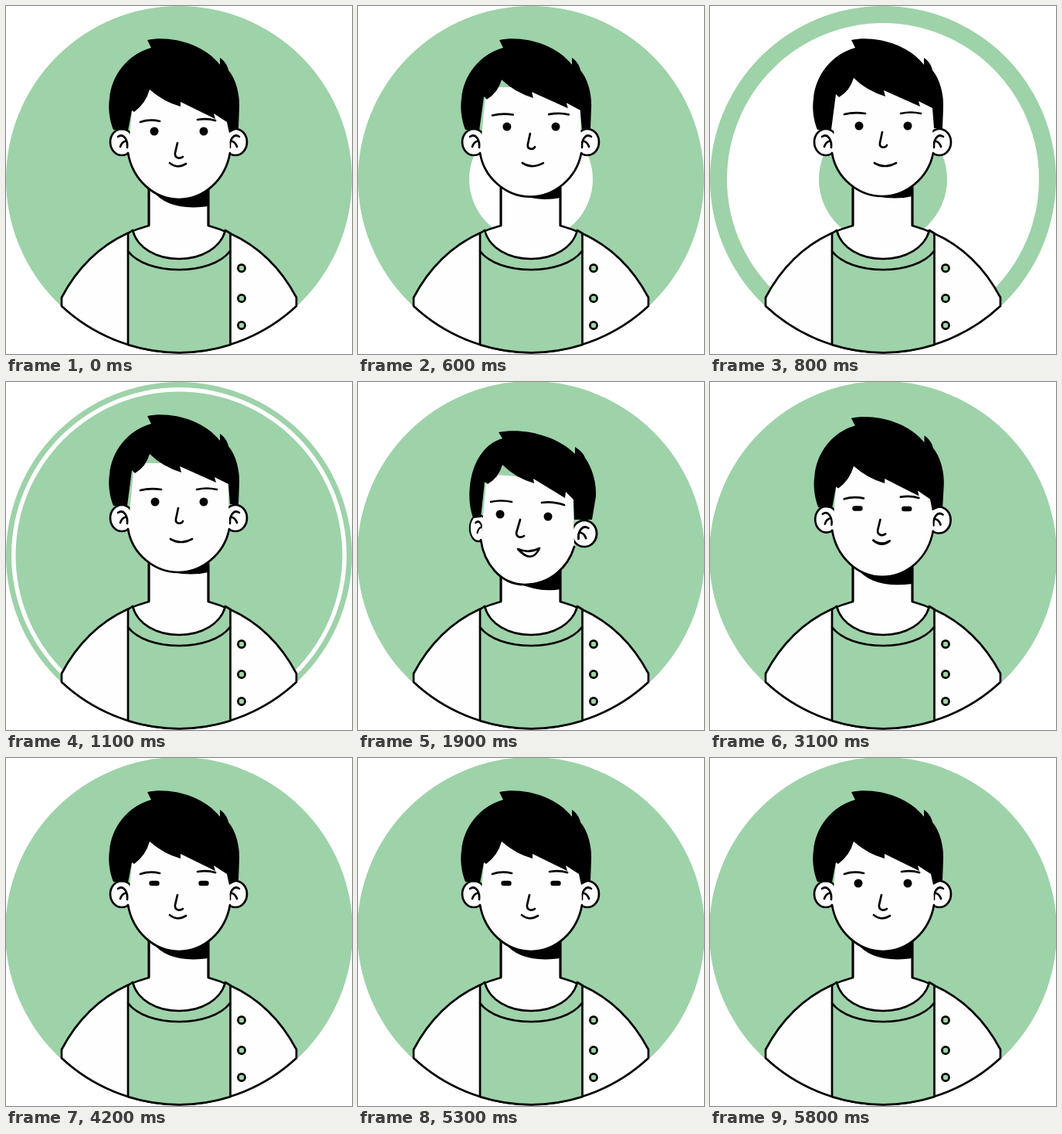
Write an HTML page that moves like this. It is 448 by 450 pixels and loops after 6000 ms.

```html
<!DOCTYPE html>
<html lang="en">
<head>
<meta charset="utf-8">
<title>Avatar</title>
<style>
  html, body { margin: 0; width: 100%; height: 100%; overflow: hidden; background: #fff; }
  svg { display: block; width: 100%; height: 100%; }
  .green { fill: #9ed2a9; }
  .skin { fill: #fefefe; }
  .line { stroke: #000; stroke-width: 2.7; stroke-linecap: round; stroke-linejoin: round; }
  .none { fill: none; }
</style>
</head>
<body>
<svg viewBox="0 0 448 450">
  <clipPath id="neck"><path d="M185 225H262V300H185Z"/></clipPath>

  <circle class="green" cx="224" cy="224" r="224"/>
  <circle id="ringOuter" cx="224" cy="224" fill="#fff"/>
  <circle id="ringInner" class="green" cx="224" cy="224"/>

  <path class="skin line" d="M185 230V284Q170 288 157 294C118 312 91 341 72 377V388A223 223 0 0 0 376 388V377C357 341 330 312 290 294Q276 288 262 284V230Z"/>
  <path class="green line" d="M158 294L164 290C170 313 195 327 224 327S278 313 284 290L290.5 294V438A223 223 0 0 1 158 438Z"/>
  <path class="line none" d="M158 317C170 333 197 341 224 341S278 333 290 317"/>
  <g id="buttons" class="green line"></g>

  <path id="shadow" clip-path="url(#neck)"/>
  <path class="line none" d="M185 236V284M262 236V284"/>
  <g id="earL"><ellipse class="skin line" rx="15" ry="17"/><path class="line none" d="M-5-7C2-12 8-3 7 7M-2 6Q0 0 4-1"/></g>
  <g id="earR"><ellipse class="skin line" rx="15" ry="17"/><path class="line none" d="M5-7C-2-12-8-3-7 7M2 6Q0 0-4-1"/></g>
  <path id="face" class="skin"/>
  <path id="jaw" class="line none"/>
  <path id="hair"/>
  <path id="brows" class="line none"/>
  <path id="nose" class="line none"/>
  <path id="mouth" class="skin line"/>
  <rect id="eyeL"/>
  <rect id="eyeR"/>
</svg>
<script>
const $ = id => document.getElementById(id);
const ARGS = { M: 2, L: 2, C: 6, S: 4, Q: 4, Z: 0 };
const SHAPES = {
  shadow: 'MQLLZ', face: 'MCSLLZ', jaw: 'MCS', hair: 'MCCLCLCCLLLLLLLQQLLZ',
  brows: 'MQMQ', nose: 'MLC', mouth: 'MQQZ'
};

const crown = [139,160, 132,142,133,126,134,120, 136,90,158,62,188,54, 183,44,
  212,38,255,48,277,76, 277,67, 283,71,287,77,288,83, 298,95,303,115,302,132, 301,158];

const neutral = {
  shadow: [189,238, 210,266,262,259, 262,225, 189,225],
  jaw: [158,190, 164,225,192,250,224,250, 284,225,290,190],
  hair: [...crown, 289,164, 286,150, 269,139, 271,146, 226,124, 226,130,
    204,124,186,108, 181,126,166,137, 163,135, 158,161],
  brows: [174,150, 186,146,199,149, 248,147, 261,145,271,148],
  nose: [222,177, 219,190, 218,197,225,198,229,195],
  mouth: [212,203, 222,211,233,204, 222,211,212,203],
  eyes: [192,162, 256,162],
  ears: [150,176,1, 297,176,1]
};

const up = {
  shadow: [216,246, 240,251,262,246, 262,225, 216,225],
  jaw: [158,190, 163,222,192,246,223,246, 283,222,289,190],
  hair: [...crown, 290,158, 288,132, 270,123, 272,130, 225,109, 227,117,
    202,109,186,93, 181,110,167,118, 163,114, 157,160],
  brows: [174,140, 186,137,201,139, 247,139, 260,136,273,139],
  nose: [223,163, 220,177, 219,184,227,184,229,180],
  mouth: [213,203, 226,211,241,203, 226,211,213,203],
  eyes: [193,155, 256,155],
  ears: [150,176,1, 297,176,1]
};

// Halfway from looking up to the full nod
const half = {
  shadow: [205,259, 235,273,262,268, 262,235, 205,235],
  jaw: [159,204, 163,234,184,262,216,262, 272,240,280,213],
  hair: [149,176, 143,158,144,142,145,134, 148,106,162,80,187,73, 182,65,
    212,59,256,68,281,93, 281,84, 287,88,292,92,294,98, 304,112,309,132,308,148, 303,178,
    280,178, 279,152, 269,142, 268,150, 227,125, 228,131,
    204,124,187,107, 182,124,168,132, 164,129, 159,175],
  brows: [172,155, 185,152,199,155, 238,156, 252,154,267,159],
  nose: [210,178, 205,195, 205,201,211,202,215,199],
  mouth: [207,216, 221,222,235,215, 225,236,207,216],
  eyes: [184,171, 246,174],
  ears: [156,189,.75, 293,196,1.07]
};

const lerp = (a, b, k) => a + (b - a) * k;
const blend = (a, b, k) => Object.fromEntries(
  Object.keys(a).map(key => [key, a[key].map((v, i) => lerp(v, b[key][i], k))]));
const down = blend(up, half, 2);

const easeInOut = k => k < .5 ? 4 * k ** 3 : 1 - 4 * (1 - k) ** 3;
const poseKeys = [[0, neutral], [300, neutral], [750, up], [1600, up], [2200, down], [2800, down], [3200, neutral], [6000, neutral]];
const outerKeys = [[300, 0], [400, 6], [500, 28], [600, 80], [700, 155], [800, 202], [900, 210], [1100, 217], [1500, 225]];
const innerKeys = [[500, 0], [600, 8], [700, 35], [800, 83], [900, 165], [1000, 202], [1100, 211.5], [1300, 218], [1600, 225]];
const lids = {
  3100: .6, 3200: .2, 3300: .2, 3400: .6, 3600: .6, 3700: .2,
  4200: .6, 4300: .2, 4400: .2, 4500: .6,
  5300: .6, 5400: .2, 5500: .15, 5600: .35, 5700: .7
};

function span(keys, t) {
  const last = keys.length - 1;
  if (t <= keys[0][0]) return [keys[0][1], keys[0][1], 0];
  if (t >= keys[last][0]) return [keys[last][1], keys[last][1], 0];
  const i = keys.findIndex(key => key[0] > t);
  const [t0, a] = keys[i - 1], [t1, b] = keys[i];
  return [a, b, (t - t0) / (t1 - t0)];
}

function toPath(cmds, nums) {
  let i = 0;
  return [...cmds].map(c => c + nums.slice(i, i += ARGS[c]).map(n => n.toFixed(2)).join(' ')).join('');
}

function setAttrs(id, attrs) {
  for (const name in attrs) $(id).setAttribute(name, attrs[name]);
}

function drawEye(id, x, y, open) {
  const w = 11 + 6 * (1 - open), h = 11 * open;
  setAttrs(id, { x: x - w / 2, y: y - h / 2, width: w, height: h, rx: h / 2 });
}

function draw(t) {
  const [a, b, k] = span(poseKeys, t);
  const pose = blend(a, b, easeInOut(k));
  const [lx, ly] = pose.jaw, [rx, ry] = pose.jaw.slice(-2);
  pose.face = [...pose.jaw, rx - 2, ry - 85, lx + 8, ly - 85];
  for (const id in SHAPES) $(id).setAttribute('d', toPath(SHAPES[id], pose[id]));

  const open = lids[t] ?? 1;
  const [ex, ey, fx, fy] = pose.eyes;
  drawEye('eyeL', ex, ey, open);
  drawEye('eyeR', fx, fy, open);

  ['earL', 'earR'].forEach((id, i) => {
    const [x, y, s] = pose.ears.slice(i * 3);
    $(id).setAttribute('transform', `translate(${x} ${y}) scale(${s} 1)`);
  });
  $('ringOuter').setAttribute('r', lerp(...span(outerKeys, t)));
  $('ringInner').setAttribute('r', lerp(...span(innerKeys, t)));
}

$('buttons').innerHTML = [339, 378, 413].map(y => `<circle cx="305" cy="${y}" r="4.6"/>`).join('');

const start = performance.now();
function tick() {
  const t = (performance.now() - start) % 6000;
  draw(Math.floor(t / 100) * 100);
  requestAnimationFrame(tick);
}
tick();
</script>
</body>
</html>
```
